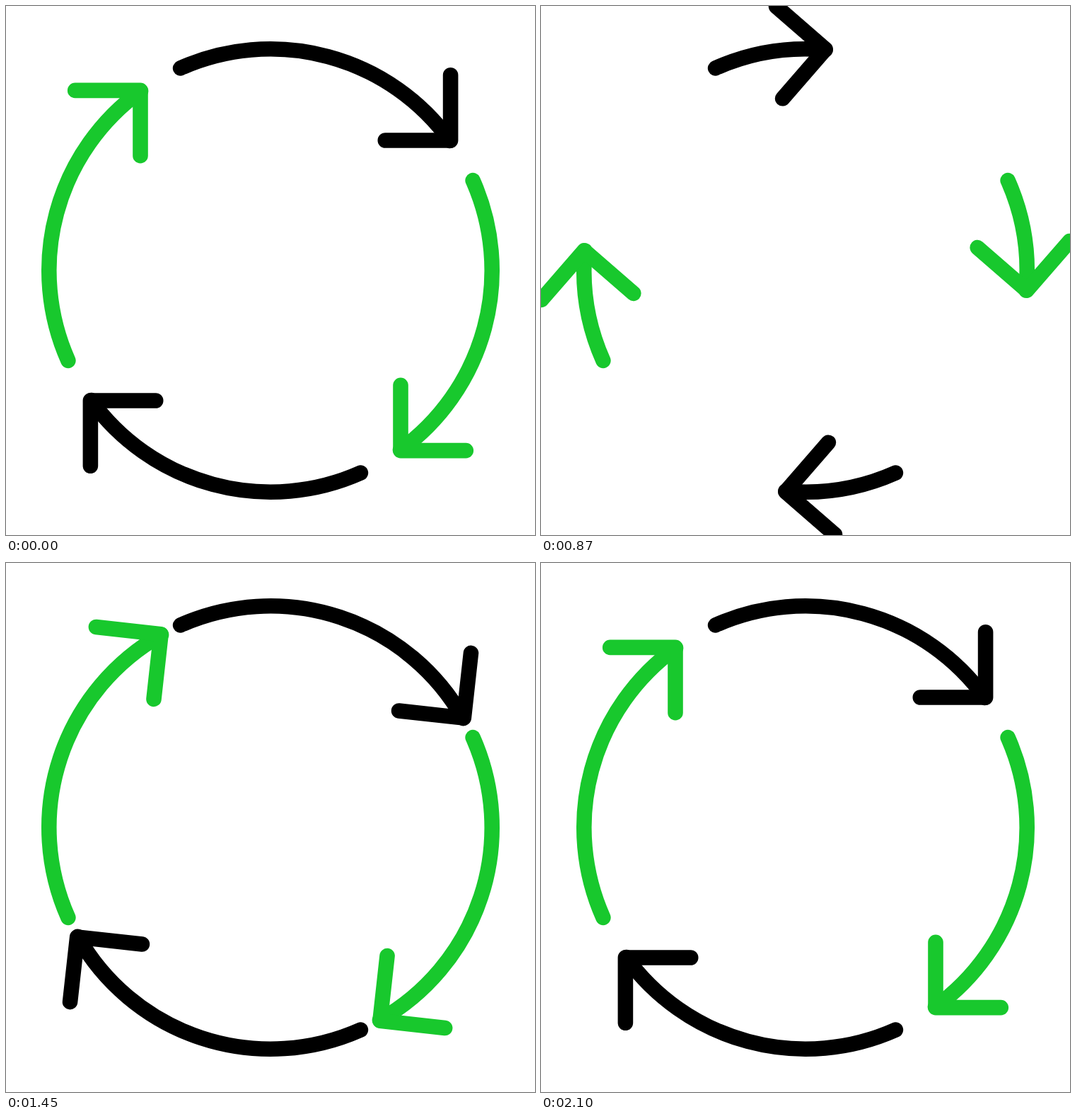
These frames come from a looping animation (748x748 px, 2.12 s). An HTML page:

```html
<!DOCTYPE html>
<html lang="en">
<head>
<meta charset="utf-8">
<title>Cycle arrows</title>
<style>
  html, body { margin: 0; width: 100%; height: 100%; overflow: hidden; background: #fff; }
  svg { display: block; width: 100%; height: 100%; }
  path { fill: none; stroke-width: 21.6; stroke-linecap: round; stroke-linejoin: round; }
</style>
</head>
<body>
<svg viewBox="-374 -374 748 748"></svg>
<script>
const LOOP = 2120, STEP = 25;
const RADIUS = 313.2, TAIL = -24, TIP = 54.14;
const svg = document.querySelector('svg');

const easeOut = u => 1 - (1 - u) ** 3;
const easeBoth = u => u * u * (3 - 2 * u);

// Tip swing: [time in ms, degrees from rest, easing towards this key]
const keys = [
  [100, 0],
  [880, -49, easeOut],
  [1375, 8.5, easeBoth],
  [1725, -10, easeBoth],
  [2100, 0, easeBoth]
];

function swing(t) {
  const i = keys.findIndex(([time]) => t < time);
  if (i < 1) return 0;
  const [t0, a] = keys[i - 1], [t1, b, ease] = keys[i];
  return a + (b - a) * ease((t - t0) / (t1 - t0));
}

// Point on the ring, with the angle measured clockwise from the top
function onRing(deg) {
  const a = deg * Math.PI / 180;
  return `${RADIUS * Math.sin(a)} ${-RADIUS * Math.cos(a)}`;
}

function addPath(parent, d) {
  const path = document.createElementNS(svg.namespaceURI, 'path');
  path.setAttribute('d', d);
  parent.append(path);
  return path;
}

const arrows = ['#000', '#18c82d', '#000', '#18c82d'].map((color, i) => {
  const group = document.createElementNS(svg.namespaceURI, 'g');
  group.setAttribute('stroke', color);
  group.setAttribute('transform', `rotate(${i * 90})`);
  svg.append(group);
  return {
    arc: addPath(group, ''),
    head: addPath(group, 'M162.3 -184H254.6V-276.3')
  };
});

function draw(now) {
  const t = Math.floor((now % LOOP + 5) / STEP) * STEP;
  const turn = swing(t);
  const curve = `M${onRing(TAIL)}A${RADIUS} ${RADIUS} 0 0 1 ${onRing(TIP + turn)}`;
  for (const { arc, head } of arrows) {
    arc.setAttribute('d', curve);
    head.setAttribute('transform', `rotate(${turn})`);
  }
}

let start;
function tick(now) {
  start ??= now;
  draw(now - start);
  requestAnimationFrame(tick);
}
draw(0);
requestAnimationFrame(tick);
</script>
</body>
</html>
```
